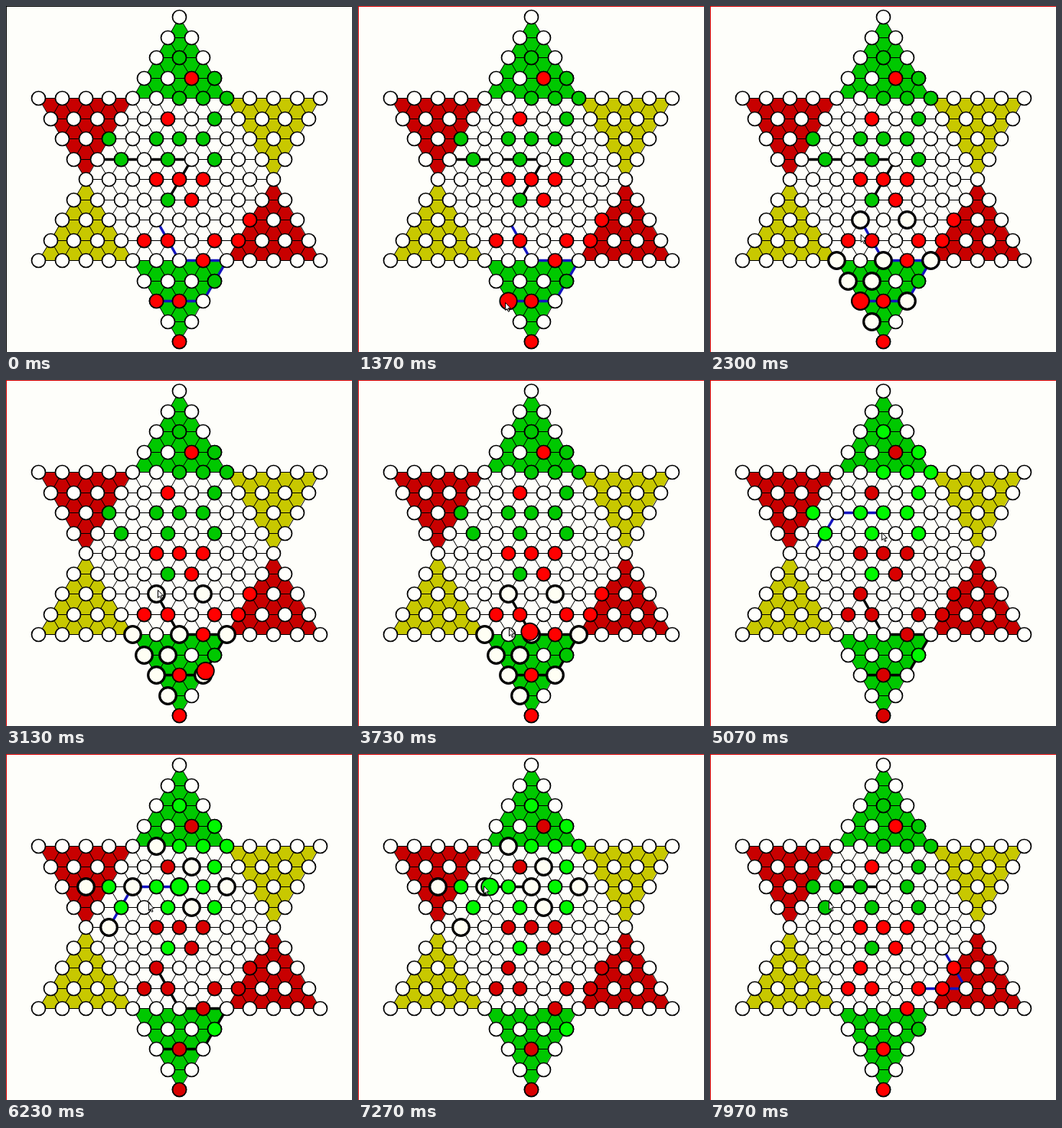
Write an HTML page with a canvas that moves like this. It is 452 by 452 pixels and loops after 8 s.

```html
<!DOCTYPE html>
<html lang="en">
<head>
<meta charset="utf-8">
<title>Star board</title>
<style>
html, body { margin: 0; width: 100%; height: 100%; overflow: hidden; background: #fefefa; }
canvas { display: block; width: 452px; height: 452px; }
</style>
</head>
<body>
<canvas id="board" width="452" height="452"></canvas>
<script>
const ctx = document.getElementById('board').getContext('2d');
const LOOP = 8000, HOP = 305, FADE = 280;
const PAPER = '#fefefa', BLACK = '#000', BLUE = '#1414c0';
const CORNERS = ['#00c800', '#c8c800', '#c80000'];

// Opening position, one string per row: g green, r red.
const LAYOUT = `
  . .. .g. ..rg
  ......ggg.... .....r.g.... ..g.ggg.... ..g.g.g...
  ...rrr...
  ....gr.... ........r.. ....rr.rr... .......r.....
  ...g rr. .. r`.trim().split(/\s+/);

// Holes are [row, offset], the offset counted in half steps from the centre line.
const holes = new Map(), pieces = new Map();
LAYOUT.forEach((line, row) => [...line].forEach((mark, i) => {
  const hole = [row, 2 * i - line.length + 1];
  holes.set(String(hole), hole);
  if (mark !== '.') pieces.set(String(hole), mark);
}));
const DIRECTIONS = [[0, 2], [0, -2], [1, -1], [1, 1], [-1, -1], [-1, 1]];
const shift = ([row, off], [dr, dо], n = 1) => [row + n * dr, off + n * dо];
const pos = ([row, off]) =>
  [Math.round(226.4 + off * 15.33) + 0.5, Math.floor(14.5 + row * 26.5) + 0.5];

// Every hole reachable by a chain of hops or a single step, with its route.
function routesFrom(from, to) {
  const routes = new Map();
  const taken = h => pieces.has(String(h)) && String(h) !== String(from) && String(h) !== String(to);
  const open = h => holes.has(String(h)) && !taken(h) && !routes.has(String(h));
  const hop = route => {
    const at = route[route.length - 1];
    routes.set(String(at), route);
    for (const d of DIRECTIONS) {
      const landing = shift(at, d, 2);
      if (taken(shift(at, d)) && open(landing)) hop([...route, landing]);
    }
  };
  hop([from]);
  for (const d of DIRECTIONS) {
    const step = shift(from, d);
    if (open(step)) routes.set(String(step), [from, step]);
  }
  return routes;
}
const route = (from, to) => routesFrom(from, to).get(String(to));

function planMove(from, to, hinted, times) {
  const routes = routesFrom(from, to);
  const path = routes.get(String(to));
  const move = {
    path, ...times,
    hint: routes.get(String(hinted)),
    rings: [...routes.keys()].map(k => holes.get(k)),
    end: times.start + HOP * (path.length - 1)
  };
  pieces.set(String(to), pieces.get(String(from)));
  pieces.delete(String(from));
  return move;
}

const earlierPath = route([7, -7], [9, -1]);
const redMove = planMove([14, -2], [10, -2], [10, -2], { hover: 1250, pick: 1560, start: 2795 });
const greenMove = planMove([6, 0], [6, -4], [8, -6], { hover: 5300, pick: 5500, start: 7000 });
const nextHint = route([11, 3], [9, 5]);
const moves = [redMove, greenMove];
for (const { path } of moves) pieces.delete(String(path[path.length - 1]));

// The pointer glides to each stop, arriving at the given time.
const GLIDE = 500;
const stops = [[0, 204, 465], [1300, 192, 387], [2450, 198, 274], [3700, 197, 324],
  [4900, 223, 208], [5400, 227, 174], [6200, 186, 194], [6750, 164, 172], [7800, 155, 193]];

const clamp = v => Math.max(0, Math.min(1, v));
const lerp = (a, b, k) => a + (b - a) * k;

function trace(points) {
  ctx.beginPath();
  points.forEach(p => ctx.lineTo(...p));
}

function polyline(path, color, width) {
  trace(path.map(pos));
  ctx.strokeStyle = color;
  ctx.lineWidth = width;
  ctx.stroke();
}

function disc([x, y], radius, fill, width = 1.7) {
  ctx.beginPath();
  ctx.arc(x, y, radius, 0, 7);
  ctx.fillStyle = fill;
  ctx.fill();
  ctx.strokeStyle = BLACK;
  ctx.lineWidth = width;
  ctx.stroke();
}

function drawBoard() {
  ctx.fillStyle = PAPER;
  ctx.fillRect(0, 0, 452, 452);
  const [cx, cy] = pos([8, 0]);
  const polar = (deg, radius) =>
    [cx + radius * Math.sin(deg * Math.PI / 180), cy - radius * Math.cos(deg * Math.PI / 180)];
  for (let k = 0; k < 6; k++) {
    trace([polar(60 * k, 212), polar(60 * k - 30, 122.5), polar(60 * k + 30, 122.5)]);
    ctx.fillStyle = CORNERS[k % 3];
    ctx.fill();
  }
  for (const hole of holes.values())
    for (const d of DIRECTIONS) {
      const next = shift(hole, d);
      if (holes.has(String(next)) && (d[0] > 0 || d[1] === 2)) polyline([hole, next], BLACK, 1);
    }
}

function drawPaths(t) {
  const [last, hint] =
    t < redMove.start ? [earlierPath, redMove.hint] :
    t < redMove.end ? [redMove.path] :
    t < greenMove.start ? [redMove.path, greenMove.hint] :
    t < greenMove.end ? [greenMove.path] : [greenMove.path, nextHint];
  polyline(last, BLACK, 3.4);
  if (hint) polyline(hint, BLUE, 3.4);
}

function drawMover({ path, hover, start, end }, t, color) {
  const last = path.length - 1;
  const along = last * clamp((t - start) / (end - start));
  const i = Math.min(Math.floor(along), last - 1);
  const a = pos(path[i]), b = pos(path[i + 1]);
  const active = t >= hover && t < end;
  disc(a.map((v, k) => lerp(v, b[k], along - i)), active ? 11.2 : 9, color);
}

function drawPointer(t) {
  const n = stops.findIndex(s => s[0] > t);
  const i = n < 0 ? stops.length - 1 : Math.max(n, 1);
  const a = stops[i - 1], b = stops[i];
  const k = clamp((t - b[0] + GLIDE) / GLIDE), e = k * k * (3 - 2 * k);
  ctx.save();
  ctx.translate(lerp(a[1], b[1], e), lerp(a[2], b[2], e));
  const arrow = new Path2D('M.5 .5V10.5L2.7 8.4L4.4 12.3L6 11.6L4.3 7.8H7.4Z');
  ctx.fillStyle = '#fff';
  ctx.fill(arrow);
  ctx.strokeStyle = BLACK;
  ctx.lineWidth = 1;
  ctx.stroke(arrow);
  ctx.restore();
}

function draw(t) {
  drawBoard();
  drawPaths(t);
  for (const hole of holes.values()) disc(pos(hole), 9, '#fffffc');
  for (const m of moves)
    if (t >= m.pick && t < m.end) m.rings.forEach(h => disc(pos(h), 10.8, '#fffff4', 3.2));

  // The side to move is lit; the light fades across after each move.
  const greenTurn = clamp((t - redMove.end) / FADE) - clamp((t - greenMove.end) / FADE);
  const fill = {
    r: `rgb(${lerp(255, 216, greenTurn)},0,0)`,
    g: `rgb(0,${lerp(200, 248, greenTurn)},0)`
  };
  for (const [key, side] of pieces) disc(pos(holes.get(key)), 9, fill[side]);
  drawMover(greenMove, t, fill.g);
  drawMover(redMove, t, fill.r);

  ctx.fillStyle = t < 780 ? BLACK : '#d80000';
  ctx.fillRect(0, 0, 452, 1);
  ctx.fillRect(0, 0, 1, 452);
  drawPointer(t);
}

const began = performance.now();
function tick() {
  draw((performance.now() - began) % LOOP);
  requestAnimationFrame(tick);
}
tick();
</script>
</body>
</html>
```
